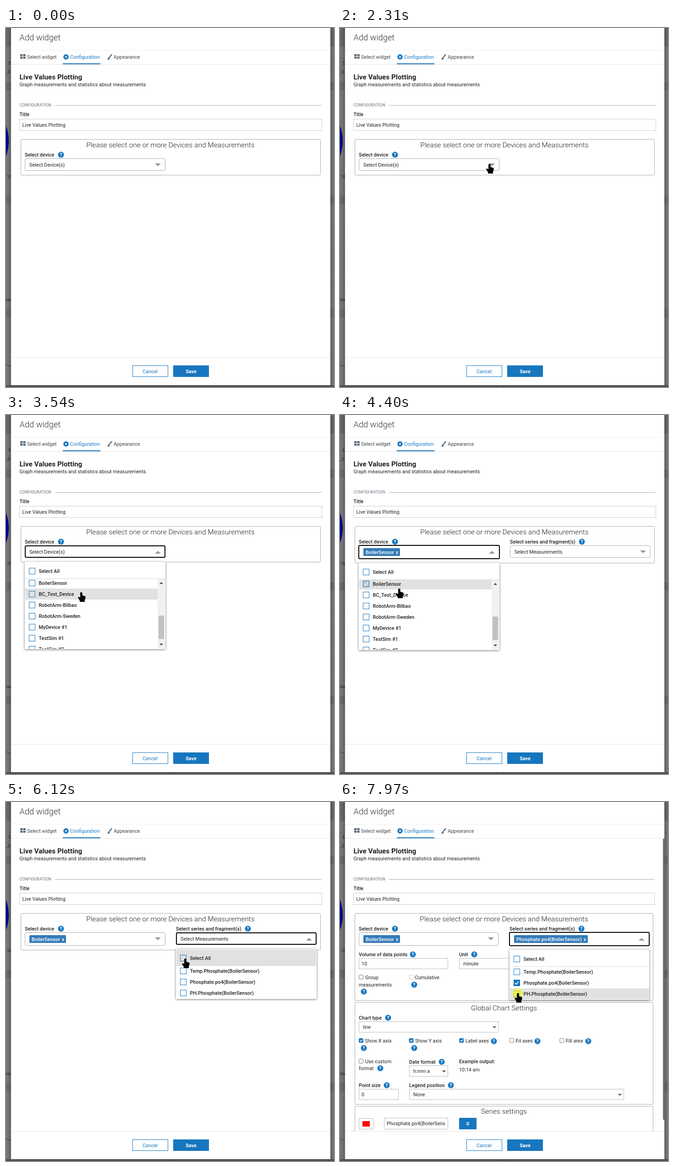
Animation, 716 px wide and 782 px high, one loop 8 s. Source, as an HTML page:

```html
<!DOCTYPE html>
<html lang="en">
<head>
<meta charset="utf-8">
<title>Add widget</title>
<style>
html, body { margin: 0; width: 716px; height: 782px; overflow: hidden; background: #fff; }
svg { display: block; font-family: Roboto, sans-serif; white-space: pre; }
.drop { filter: drop-shadow(0 1px 2.5px #777); }
</style>
</head>
<body>
<svg id="stage" width="716" height="782"></svg>
<script>
const LOOP = 8000, BLUE = '#1776bf', INK = '#222', TITLE = 'Live Values Plotting';
const stage = document.getElementById('stage');

// Moments at which the form changes
const AT = { cursor: 220, focusLeft: 2440, openLeft: 2580, pressLeft: 4270, pickLeft: 4400,
  closeLeft: 5140, openRight: 5760, pressRight: 7100, pickRight: 7240 };
const CLICKS = [2440, 4270, 5760, 7970];

// Pointer path: time, x, y
const PATH = [
  [220, 595, 736], [470, 320, 533], [600, 320, 533], [840, 320, 425], [970, 320, 425],
  [1210, 258, 345], [1450, 92, 240], [1700, 300, 297], [1830, 300, 297], [2190, 340, 299],
  [2310, 326, 297], [2580, 326, 297], [2940, 240, 400], [3300, 180, 390], [3540, 164, 387],
  [4150, 129, 373], [4270, 129, 374], [4402, 129, 379], [5020, 332, 299], [5390, 334, 299],
  [5640, 655, 298], [5770, 655, 298], [6124, 391, 342], [6370, 389, 390], [6500, 389, 390],
  [6740, 389, 408], [6860, 389, 393], [7240, 389, 393], [7480, 388, 411], [7600, 387, 415],
  [7850, 388, 417], [8000, 388, 417]];

const DEVICES = [...Array.from({ length: 8 }, (_, i) => 'TestDevice #' + (i + 1)),
  'BoilerSensor', 'BC_Test_Device', 'RobotArm-Bilbao', 'RobotArm-Sweden', 'MyDevice #1', 'TestSim #1', 'TestSim #2'];
const SERIES = ['Temp.Phosphate(BoilerSensor)', 'Phosphate.po4(BoilerSensor)', 'PH.Phosphate(BoilerSensor)'];

const clamp = v => Math.max(0, Math.min(1, v));
const rect = (x, y, w, h, fill, more = '') =>
  `<rect x="${x}" y="${y}" width="${w}" height="${h}" fill="${fill}" ${more}/>`;
const frame = (x, y, w, h, stroke = '#bbb', r = 0) =>
  rect(x + .5, y + .5, w - 1, h - 1, '#fff', `stroke="${stroke}" rx="${r}"`);
const path = (d, stroke, width = 1, fill = 'none') =>
  `<path d="${d}" stroke="${stroke}" stroke-width="${width}" fill="${fill}"/>`;
// y is the middle of the capitals
const text = (s, x, y, { size = 10.8, weight = 400, fill = INK, anchor = 'start' } = {}) =>
  `<text x="${x}" y="${y + size * .355}" font-size="${size}" font-weight="${weight}" fill="${fill}" text-anchor="${anchor}">${s}</text>`;
const label = (s, x, y) => text(s, x, y, { weight: 500 });
const heading = (s, x, y) => text(s, x, y, { size: 15.5, weight: 300, anchor: 'middle' });
const help = (x, y) => `<circle cx="${x}" cy="${y}" r="6.5" fill="${BLUE}"/>` +
  text('?', x, y, { size: 10, weight: 700, fill: '#fff', anchor: 'middle' });
const labelHelp = (s, x, y, hx) => label(s, x, y) + help(hx, y);

const input = (x, y, w, value) => frame(x, y, w, 24) + text(value, x + 6, y + 12);
const select = (x, y, w, value) => frame(x, y, w, 24) + text(value, x + 9, y + 12) +
  path(`M${x + w - 12} ${y + 10.5}l3 3 3-3`, INK, 1.6);

function tick(x, y, on, disabled) {
  return rect(x + .5, y - 4.5, 9, 9, on ? BLUE : '#fff', `rx="1.5" stroke="${on ? BLUE : disabled ? '#ccc' : '#777'}"`) +
    (on ? path(`M${x + 2.5} ${y}l2 2 3.5-4`, '#fff', 1.5) : '');
}

function backdrop() {
  let s = rect(0, 0, 716, 782, '#757575') + rect(0, 0, 716, 40, '#666');
  for (const y of [118, 365, 612]) s += rect(0, y, 716, 18, '#696969');
  for (const y of [40, 66, 88, 433, 456, 480, 504, 528, 552]) s += rect(0, y, 716, 1, '#666');
  s += '<circle cx="-88" cy="246" r="94" fill="#00008a"/>' + path('M0 733L11 738', '#333');
  s += text('5', 5, 77, { size: 9 }) + text('_D', 0, 96, { size: 9 }) +
    text('16', 2, 324, { size: 9 }) + text('Dev', -3, 592, { size: 9 });
  s += rect(6, 0, 5, 779, '#000', 'opacity=".12"') + rect(708, 0, 4, 779, '#000', 'opacity=".12"');
  return s + rect(0, 778, 716, 4, '#505050') + rect(357, 778, 1, 4, INK);
}

function icons() {
  let s = '';
  for (const x of [31, 37.5]) for (const y of [57, 62.5]) s += rect(x, y, 5.3, 4.3, '#5b6b7c');
  for (let a = 0; a < 180; a += 45)
    s += rect(129.5, 57, 3, 12, BLUE, `transform="rotate(${a} 131 63)"`);
  s += `<circle cx="131" cy="63" r="3.2" fill="#fff" stroke="${BLUE}" stroke-width="2.6"/>`;
  return s + path('M231 57.5L225.5 64', '#5b6b7c', 2.6) +
    path('M224 63.5l3 2.5q-1.5 4-7 2.5 2.5-.5 2.5-2.5 .3-2 1.5-2.5z', 'none', 0, '#5b6b7c');
}

function combo(x, w, h, { focus, pressed, open, chip, hint }) {
  const g = pressed ? 0 : 1, left = x + w - 23;
  let s = focus
    ? rect(x + g, 284 + g, w - 2 * g, h - 2 * g, '#fff', 'stroke="#000" stroke-width="2" rx="2"')
    : frame(x, 284, w, h, '#adadad', 3);
  if (chip) {
    const chipWidth = chip.length > 15 ? 161 : 80;
    s += rect(x + 10, 290, chipWidth, 17, '#337ab7', 'rx="2"') +
      text(chip, x + 15, 299, { weight: 500, fill: '#fff' }) +
      text('x', x + chipWidth + 3.5, 299.5, { weight: 500, fill: '#fff', anchor: 'middle' });
  } else s += text(hint, x + 10, 298);
  return s + path(open ? `M${left} 302h13l-6.5-6z` : `M${left} 295h13l-6.5 6z`, 'none', 0, '#999');
}

function checkbox(x, y, on = 0) {
  return rect(x + .5, y - 6.5, 13, 13, 'none', `stroke="${BLUE}"`) +
    (on ? `<g opacity="${on}">${rect(x, y - 7, 14, 14, BLUE)}${path(`M${x + 3} ${y}l3 3 5-6`, '#fff', 1.8)}</g>` : '');
}

function dropdown(x, w, top, items, listHeight, scroll, picked, amount, p) {
  const listTop = top + 36, bar = items.length > 3 ? 17 : 0;
  const inside = p.x > x && p.x < x + w - bar;
  let s = rect(x, top, w, 37 + listHeight, '#fff', 'class="drop"');
  if (inside && p.y > top && p.y < listTop) s += rect(x + 1, top + 1, w - 2, 35, '#e1e1e1');
  s += checkbox(x + 9, top + 20) + label('Select All', x + 30.5, top + 20);
  s += `<svg x="${x}" y="${listTop}" width="${w}" height="${listHeight}">`;
  const hover = inside && p.y >= listTop && p.y < listTop + listHeight
    ? Math.floor((p.y - listTop + scroll) / 24) : -1;
  items.forEach((item, i) => {
    const y = 24 * i - scroll;
    if (i === hover) s += rect(1, y, w - bar - 1, 24, '#e1e1e1');
    s += checkbox(9, y + 12, i === picked ? amount : 0) + label(item, 30.5, y + 12);
  });
  if (bar) s += rect(w - bar, 0, 16, listHeight, '#f1f1f1') +
    rect(w - 15, 17 + scroll * .33, 12, 51, '#c1c1c1') +
    path(`M${w - 13} 12h8l-4-4z`, 'none', 0, '#444') + path(`M${w - 13} 142h8l-4 4z`, 'none', 0, '#444');
  return s + '</svg>' + rect(x, listTop, w, 1, '#ddd');
}

function chartSettings() {
  let s = labelHelp('Volume of data points', 41, 332, 159) + input(41, 340, 195, '10') +
    labelHelp('Unit', 260, 332, 293) + select(260, 340, 195, 'minute') +
    tick(41, 381.5) + text('Group', 55, 382) + text('measurements', 41, 398) + help(52, 413) +
    tick(151, 381.5, false, true) + text('Cumulative', 163, 382) + help(162, 398);
  s += frame(32, 436, 652, 223, '#aaa', 2) + heading('Global Chart Settings', 358, 448) +
    labelHelp('Chart type', 41, 470, 105) + select(41, 478, 305, 'line');
  [['Show X axis', 52, 536, 1], ['Show Y axis', 162, 536, 1], ['Label axes', 336, 521, 1],
   ['Fit axes', 431, 521], ['Fill area', 542, 521]].forEach(([name, hx, hy, on], i) => {
    const x = 41 + 109.6 * i;
    s += tick(x, 519.5, on) + text(name, x + 13.5, 520.5) + help(hx, hy);
  });
  s += tick(41, 564.5) + text('Use custom', 55, 565) + text('format', 41, 580) + help(88, 580) +
    labelHelp('Date format', 151, 566, 222) + select(151, 574, 85, 'h:mm a') +
    label('Example output:', 260, 565) + text('10:14 am', 260, 583) +
    labelHelp('Point size', 41, 617, 102) + input(41, 625, 87, '0') +
    labelHelp('Legend position', 151, 617, 242) + select(151, 625, 469, 'None');
  s += frame(32, 662, 652, 80, '#aaa', 2) + heading('Series settings', 358, 673.5) +
    frame(41, 689, 32, 24) + rect(49, 695, 16, 12, '#f00') + frame(96, 688, 140, 25) +
    `<svg x="96" y="688" width="134" height="25">${text(SERIES[1], 6, 12.5)}</svg>` +
    rect(260, 688, 38, 25, BLUE) + path('M276 697l3 3 3-3m-6 4l3 3 3-3', '#fff', 1.5);
  return s + rect(705, 80, 3, 612, '#65707a');
}

function footer() {
  return rect(11, 717, 697, 61, '#fff') + rect(11, 717, 697, 1, '#e6e6e6') +
    frame(276, 735, 78, 25, BLUE) + text('Cancel', 314.5, 748, { fill: BLUE, anchor: 'middle' }) +
    rect(365, 735, 78, 25, BLUE) + text('Save', 404, 748, { weight: 700, fill: '#fff', anchor: 'middle' });
}

// The pointer moves in about eight steps a second
function pointerAt(t) {
  const q = 220 + 123 * Math.floor((t - 220) / 123 + .1);
  const i = Math.max(1, PATH.findIndex(k => k[0] > q));
  const [t0, x0, y0] = PATH[i - 1], [t1, x1, y1] = PATH[i];
  const f = clamp((q - t0) / (t1 - t0));
  return { x: x0 + (x1 - x0) * f, y: y0 + (y1 - y0) * f };
}

function pointer(p, hand, glow) {
  const shape = hand
    ? 'M-2 1Q-2-1 .3-1T2.7 1V6L8.5 7.5Q10 8 9.8 11L8 16V20H-3V17L-6.5 11.5Q-7 8.5-5 9L-2 11z'
    : 'M0 0V17L4 13.5 6.5 19.5 9.3 18.3 6.8 12.5H12z';
  return (glow ? `<circle cx="${p.x}" cy="${p.y}" r="11" fill="#ff0" opacity=".6"/>` : '') +
    `<path transform="translate(${p.x} ${p.y})" d="${shape}"/>`;
}

function scene(t) {
  const p = pointerAt(t), on = name => t >= AT[name];
  const picked = on('pickLeft'), full = on('pickRight');
  const leftFocus = on('focusLeft') && !on('closeLeft'), leftOpen = on('openLeft') && !on('closeLeft');
  const rightOpen = on('openRight');
  // The scrollbar narrows the form
  const edge = full ? 687 : 690, boxRight = full ? 684 : 687;
  const comboWidth = full ? 305 : 307, rightX = full ? 370 : 371;
  const height = chosen => chosen ? 29 : 27;

  let s = backdrop() + rect(11, 0, 697, 778, '#fff') +
    text('Add widget', 29.5, 21, { size: 18.3, weight: 300, fill: '#333' }) +
    rect(11, 48, 697, 1, '#eee') + rect(11, 79, 697, 1, '#e6e6e6') + rect(124, 77, 82, 2, BLUE) + icons() +
    text('Select widget', 46, 63, { fill: '#444' }) + text('Configuration', 140, 63, { fill: BLUE }) +
    text('Appearance', 235, 63, { fill: '#444' });
  s += text(TITLE, 29.5, 107, { size: 15.3, weight: 700 }) +
    text('Graph measurements and statistics about measurements', 29.5, 123.5) +
    text('CONFIGURATION', 29.5, 168, { size: 9, fill: '#66717c' }) + rect(107, 168, edge - 108, 1, '#aaa') +
    label('Title', 29.5, 188) + frame(29, 198, edge - 29, 26, '#ccc') + text(TITLE, 35.5, 211);

  s += frame(32, 242, boxRight - 32, full ? 191 : picked ? 81 : 79, '#aaa', 2) +
    heading('Please select one or more Devices and Measurements', full ? 358 : 359, 254.5);
  if (full) s += chartSettings();
  s += labelHelp('Select device', 41, 276, 120) +
    combo(41, comboWidth, height(picked), { focus: leftFocus, pressed: on('pressLeft'), open: leftOpen,
      chip: picked && DEVICES[8], hint: 'Select Device(s)' });
  if (picked) s += labelHelp('Select series and fragment(s)', rightX, 276, full ? 527 : 528) +
    combo(rightX, comboWidth, height(full), { focus: rightOpen, pressed: on('pressRight'), open: rightOpen,
      chip: full && SERIES[1], hint: 'Select Measurements' });
  s += footer();

  if (leftOpen) {
    const scroll = 194 * clamp(Math.floor((t - 2800) / 123) / 3);
    s += dropdown(41, comboWidth, picked ? 322 : 320, DEVICES, 153, scroll, 8, picked ? (t < 4520 ? .2 : 1) : 0, p);
  }
  if (rightOpen)
    s += dropdown(rightX, comboWidth, full ? 322 : 320, SERIES, 72, 0, 1, full ? (t < 7360 ? .2 : 1) : 0, p);

  if (on('cursor')) {
    const over = (x, bottom) => p.x > x && p.x < x + 307 && p.y > 284 && p.y < bottom;
    const hand = over(41, leftOpen ? 511 : 313) || picked && over(371, rightOpen ? 431 : 313);
    s += pointer(p, hand, CLICKS.some(c => t >= c && t < c + 125));
  }
  return s;
}

let shown = '';
function draw() {
  const markup = scene(performance.now() % LOOP);
  if (markup !== shown) stage.innerHTML = shown = markup;
  requestAnimationFrame(draw);
}
draw();
</script>
</body>
</html>
```
